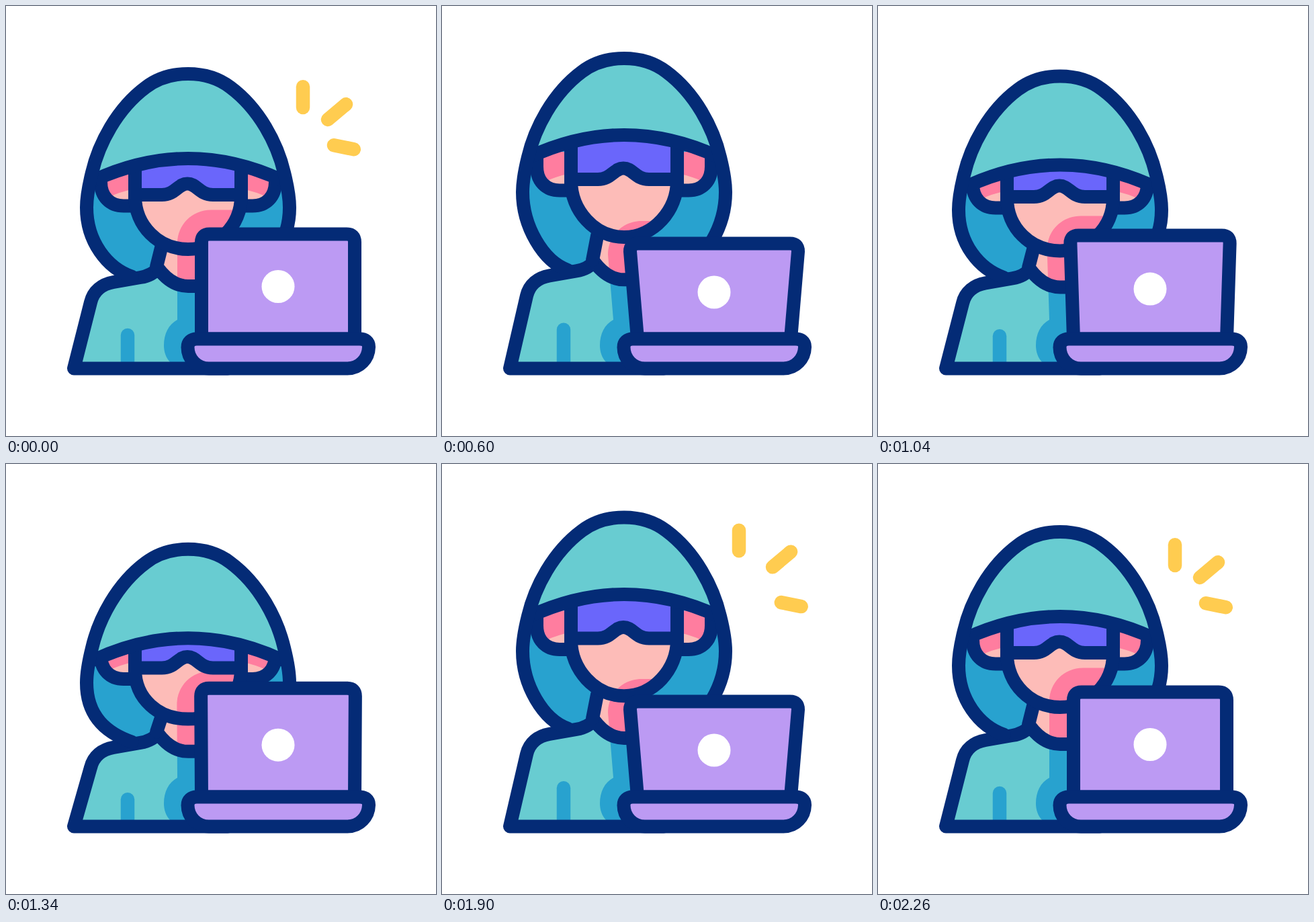
An HTML page that plays this animation: 640 by 640 pixels, repeating every 2.6 s.

```html
<!DOCTYPE html>
<html lang="en">
<head>
<meta charset="utf-8">
<title>Hooded figure with laptop</title>
<style>
  html, body { margin: 0; width: 100%; height: 100%; overflow: hidden; background: #fff; }
  svg { display: block; width: 100%; height: 100%; }
  .line { fill: none; stroke: #042b76; stroke-width: 20; stroke-linecap: round; stroke-linejoin: round; }
  .spark { fill: none; stroke: #ffcc50; stroke-width: 20.5; stroke-linecap: round; }
  .teal { fill: #68ccd1; }
  .blue { fill: #28a2cf; }
  .skin { fill: #fdbcb8; }
  .pink { fill: #ff7d9f; }
  .lilac { fill: #bc9af3; }
  .visor { fill: #6a66fb; }
</style>
</head>
<body>
<svg viewBox="0 0 640 640">
  <defs>
    <clipPath id="bodyClip"><path data-d="body"/></clipPath>
    <clipPath id="neckClip"><path data-d="neck"/></clipPath>
    <clipPath id="faceClip"><path data-d="face"/></clipPath>
    <clipPath id="earClip"><path data-d="ears"/></clipPath>
    <clipPath id="hoodClip"><path data-d="hood"/></clipPath>
    <clipPath id="topClip"><path data-d="aboveBrim"/></clipPath>
  </defs>

  <path class="blue" data-d="hood"/>

  <path class="skin" data-d="neck"/>
  <path class="pink" data-d="shade" clip-path="url(#neckClip)"/>
  <path class="teal" data-d="body"/>
  <g clip-path="url(#bodyClip)">
    <path class="blue" data-d="shade"/>
    <path data-d="sleeve" fill="none" stroke="#28a2cf" stroke-width="20.5" stroke-linecap="round"/>
  </g>
  <path class="line" data-d="body"/>
  <path class="line" data-d="neckSide"/>

  <path class="skin" data-d="ears"/>
  <path class="pink" data-d="earShade" clip-path="url(#earClip)"/>
  <path class="line" data-d="ears"/>
  <path class="skin" data-d="face"/>
  <path class="pink" data-d="shade" clip-path="url(#faceClip)"/>
  <path class="visor" data-d="visor"/>
  <path class="line" data-d="visorEdge"/>
  <path class="line" data-d="face"/>

  <path class="teal" data-d="hood" clip-path="url(#topClip)"/>
  <path class="line" data-d="brim" clip-path="url(#hoodClip)"/>
  <path class="line" data-d="hood"/>

  <path class="lilac" data-d="screen"/>
  <path class="line" data-d="screen"/>
  <circle id="dot" cx="405" r="24.5" fill="#fff"/>
  <path id="base" class="lilac line" style="fill:#bc9af3" d="M284 495.5H526C535 495.5 540 500 540 507C540 525 526 539.5 508 539.5H302C284 539.5 270.5 525 270.5 508C270.5 500 276 495.5 284 495.5Z"/>

  <g id="sparks">
    <path class="spark" d="M442 120.3V151"/>
    <path class="spark" d="M479 169L506 146.3"/>
    <path class="spark" d="M488 207.3L517.8 213.3"/>
  </g>
</svg>
<script>
const LOOP = 2600;

// Keyframes as [ms, value]
const headKeys = [[200, 0], [300, -14], [400, -22], [520, -24], [600, -23], [740, -14.5], [1040, 3.5],
  [1520, 32.5], [1620, 32.5], [1820, -21.5], [1855, -23], [1900, -21.5], [2260, 0]];
const brimKeys = [[200, 0], [300, -8], [480, -12], [600, -12], [1040, 6], [1620, 6.5], [1840, -12], [1900, -11.5], [2260, 0]];
const tiltKeys = [[300, 0], [500, 1], [600, 1], [1040, 0.42], [1500, 0], [1620, 0], [1830, 1], [1900, 1], [2260, 0]];
const riseKeys = [[560, 0], [1040, 4], [1500, 7.5], [1620, 7.5], [1830, 0]];
const burstKeys = [[200, 0], [300, 12.5], [400, 47]];
const returnKeys = [[1840, 33], [1900, 17.2], [1980, 6], [2120, 0]];
const sparkDirs = [[0, -1], [0.76, -0.65], [0.98, 0.19]];

// Smooth monotone interpolation through keyframes
function at(keys, t) {
  const last = keys.length - 1;
  if (t <= keys[0][0]) return keys[0][1];
  if (t >= keys[last][0]) return keys[last][1];
  const i = keys.findIndex(k => k[0] > t) - 1;
  const slope = j => (keys[j + 1][1] - keys[j][1]) / (keys[j + 1][0] - keys[j][0]);
  const tangent = j => {
    if (j === 0 || j === last) return 0;
    const a = slope(j - 1), b = slope(j);
    return a * b <= 0 ? 0 : 2 * a * b / (a + b);
  };
  const [t0, v0] = keys[i], [t1, v1] = keys[i + 1];
  const w = t1 - t0, x = (t - t0) / w, x2 = x * x, x3 = x2 * x;
  return v0 * (2 * x3 - 3 * x2 + 1) + v1 * (3 * x2 - 2 * x3)
    + w * (tangent(i) * (x3 - 2 * x2 + x) + tangent(i + 1) * (x3 - x2));
}

function shapes(t) {
  const h = at(headKeys, t);
  const tilt = at(tiltKeys, t);
  const rise = at(riseKeys, t);
  const f = h > 0 ? h * 0.87 : h;
  const chin = h * (h > 0 ? 0.68 : 0.78);
  const s = h * 0.42;
  const b = h + at(brimKeys, t);
  const top = 339.5 + 14 * tilt - rise;
  const left = 291 - 11 * tilt, right = 519 + 11 * tilt;
  const shadeTop = 303.5 + 16.5 * tilt + rise * 0.5;
  const shadeX = 255 - 8 * tilt;
  const brimCurve = `Q271 ${195 + b} 132 ${259 + b}`;
  const visorCurve = `M192 ${281 + f}H232C252 ${281 + f} 256 ${264.5 + f} 270 ${264.5 + f}S288 ${281 + f} 308 ${281 + f}H350`;

  return {
    hood: `M188 ${403 + s}C150 ${390 + s} 120 ${350 + h} 120 ${300 + h}C120 ${285 + h} 123 ${268 + h} 128 ${248 + h}`
      + `C138 ${205 + h} 165 ${153 + h} 208 ${121 + h}C225 ${108 + h} 247 ${101 + h} 271 ${101 + h}`
      + `S317 ${108 + h} 334 ${121 + h}C377 ${153 + h} 404 ${205 + h} 414 ${248 + h}`
      + `C419 ${268 + h} 422 ${285 + h} 422 ${300 + h}C422 ${350 + h} 392 ${390 + s} 354 ${403 + s}`,
    aboveBrim: `M0 0H640V${259 + b}H410${brimCurve}H0Z`,
    brim: `M410 ${259 + b}${brimCurve}`,
    neck: `M231 ${350 + chin}L224 ${388 + s}Q246 ${417 + s} 271 ${417 + s}H310V${350 + chin}Z`,
    neckSide: `M224 ${388 + s}L231 ${360 + chin}`,
    body: `M101 539.5L126 ${441 + s}C130 ${424 + s} 143 ${414 + s} 160 ${411 + s}L200 ${404 + s}`
      + `Q218 ${401 + s} 226 ${390 + s}Q246 ${417 + s} 271 ${417 + s}H330V539.5Z`,
    sleeve: `M181 ${490 + h * 0.36}V545`,
    shade: `M400 ${shadeTop}H${shadeX + 50}C${shadeX + 22} ${shadeTop} ${shadeX} ${shadeTop + 22} ${shadeX} ${shadeTop + 50}`
      + `L255 467C242 474 235 488 235 505C235 518 240 526 246 532H400Z`,
    ears: `M141 ${240 + f}V${262 + f}C141 ${284 + f} 155 ${297.5 + f} 175 ${297.5 + f}H192V${240 + f}`
      + `M401 ${240 + f}V${262 + f}C401 ${284 + f} 387 ${297.5 + f} 367 ${297.5 + f}H350V${240 + f}`,
    earShade: `M130 ${200 + f}H192V${272 + f}Q170 ${276 + f} 150 ${286 + f}H130Z`
      + `M412 ${200 + f}H350V${272 + f}Q372 ${276 + f} 392 ${286 + f}H412Z`,
    face: `M192 ${210 + f}V${283 + f}C192 ${327 + f} 227 ${362 + chin} 271 ${362 + chin}S350 ${327 + f} 350 ${283 + f}V${210 + f}`,
    visor: `${visorCurve}V${205 + f}H192Z`,
    visorEdge: visorCurve,
    screen: `M291 495.5L${left} ${top + 12}Q${left} ${top} ${left + 12} ${top}H${right - 12}Q${right} ${top} ${right} ${top + 12}L519 495.5Z`,
    dotY: 417.5 + 8.5 * tilt
  };
}

const paths = [...document.querySelectorAll('[data-d]')];
const dot = document.getElementById('dot');
const sparks = document.getElementById('sparks');

function draw(t) {
  const shape = shapes(t);
  for (const p of paths) p.setAttribute('d', shape[p.dataset.d]);
  dot.setAttribute('cy', shape.dotY);

  const visible = t <= 400 || t >= 1840;
  sparks.setAttribute('visibility', visible ? 'visible' : 'hidden');
  const out = at(t < 1000 ? burstKeys : returnKeys, t);
  sparkDirs.forEach(([x, y], i) =>
    sparks.children[i].setAttribute('transform', `translate(${x * out} ${y * out - 0.26 * out})`));
}

const start = performance.now();
function tick() {
  const t = (performance.now() - start) % LOOP;
  draw(Math.floor(t / 20) * 20);
  requestAnimationFrame(tick);
}
draw(0);
requestAnimationFrame(tick);
</script>
</body>
</html>
```
